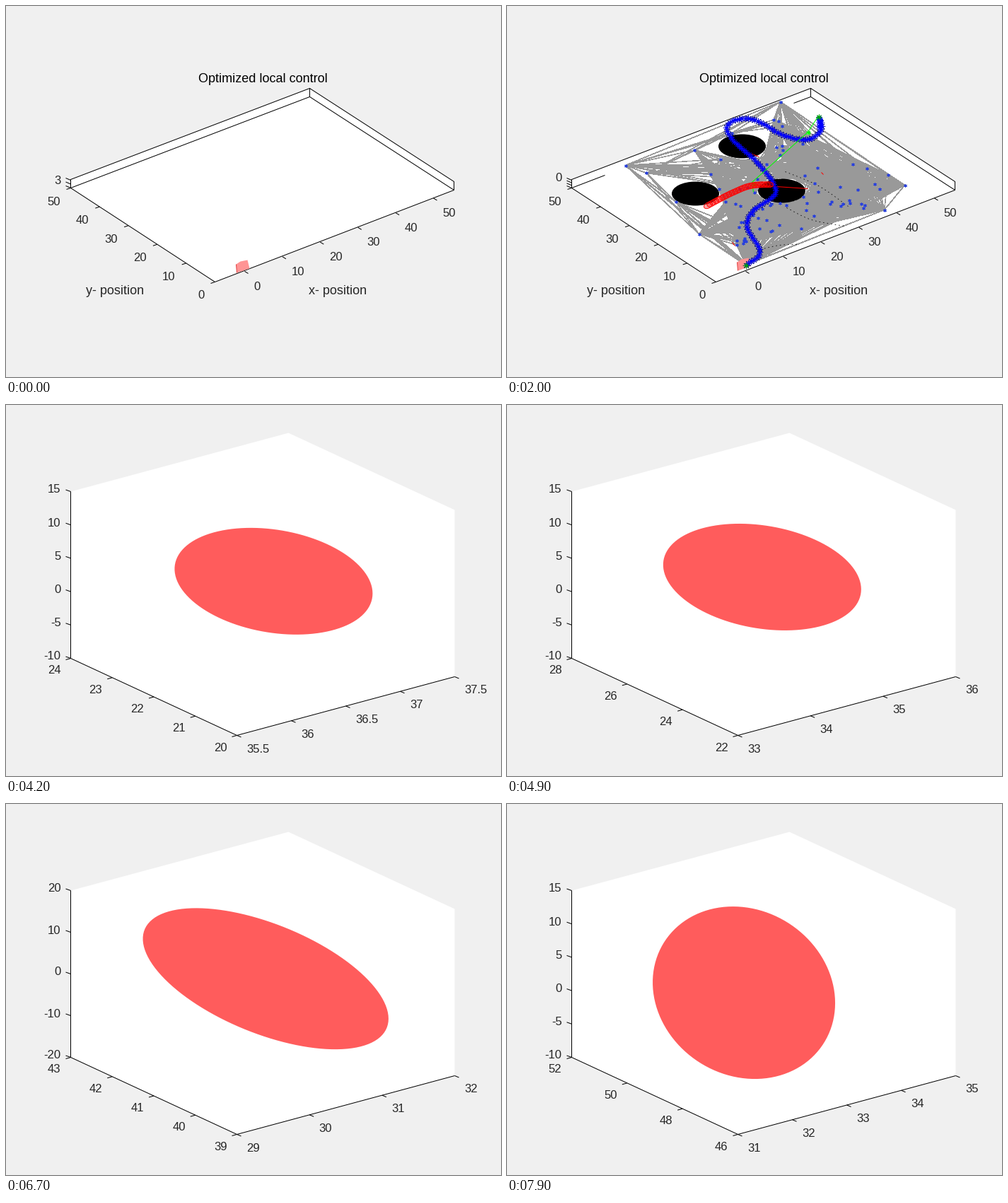
Recreate the animation shown at these times as a matplotlib script. Size 700x525 px, loop 8000 ms.

```python
import itertools

import matplotlib.pyplot as plt
import numpy as np
from matplotlib.animation import FuncAnimation
from matplotlib.collections import LineCollection
from matplotlib.patches import Ellipse, Polygon

W, H, FRAMES, SWITCH = 700, 525, 80, 37
PX = 0.72  # points per pixel at 100 dpi
INK, GRAY, RED, PINK = "#262626", "#999999", "#ff0000", "#ff5c5c"
BLUE, GREEN = "#0000ff", "#00ff00"

plt.rcParams["font.family"] = "Liberation Sans"
plt.rcParams["lines.solid_capstyle"] = "butt"
fig = plt.figure(figsize=(W / 100, H / 100), dpi=100, facecolor="#f0f0f0")
ax = fig.add_axes([0, 0, 1, 1])


def spline(pts, m=20):
    """Catmull-Rom curve through pts."""
    p = np.asarray(pts, float)
    p = np.vstack([p[:1], p, p[-1:]])
    t = np.linspace(0, 1, m, endpoint=False)[:, None]
    out = [0.5 * (2 * b + (c - a) * t + (2 * a - 5 * b + 4 * c - d) * t**2
                  + (3 * b - a - 3 * c + d) * t**3)
           for a, b, c, d in zip(p, p[1:], p[2:], p[3:])]
    return np.vstack(out + [p[-1:]])


def even(curve, step):
    """Points spaced evenly along a curve."""
    s = np.r_[0, np.cumsum(np.hypot(*np.diff(curve, axis=0).T))]
    u = np.arange(0, s[-1], step)
    return np.c_[np.interp(u, s, curve[:, 0]), np.interp(u, s, curve[:, 1])]


def line(pts, color="k", w=1.0, z=3, **kw):
    x, y = np.asarray(pts, float).T
    ax.plot(x, y, color=color, lw=w * PX, zorder=z, **kw)


def marks(pts, color, size, arms=8, w=0.8, z=5):
    x, y = np.asarray(pts, float).T
    ax.plot(x, y, ls="", marker=(arms, 2, 0), ms=size * PX, mec=color,
            mew=w * PX, zorder=z)


def text(x, y, s, ha="center", size=16.67, color=INK):
    ax.text(x, y, s, ha=ha, va="baseline", fontsize=size * PX, color=color, zorder=9)


def tick(p, d):
    line([p, (p[0] + d[0], p[1] + d[1])])


# ---------- roadmap scene ----------
FRONT, RIGHT, BACK, LEFT = (295, 390), (633, 260), (429, 128), (91, 257)
RIGHT_T, BACK_T, LEFT_T = (633, 248), (429, 116), (91, 245)

DISCS = [(332, 201), (266, 268), (388, 264)]
RX, RY = 33.5, 17
HULL = np.array([(337, 369), (271, 325), (167, 228), (386, 138), (562, 256), (533, 291)], float)


def hits(a, b):
    """Does segment a-b touch an obstacle?"""
    for c in DISCS:
        p, q = (a - c) / (RX, RY), (b - c) / (RX, RY)
        d = q - p
        t = np.clip(-p @ d / max(d @ d, 1e-9), 0, 1)
        if np.hypot(*(p + t * d)) < 1.03:
            return True
    return False


rng = np.random.default_rng(4)
inner = rng.dirichlet([0.4] * len(HULL), 80) @ HULL
NODES = np.vstack([HULL, [p for p in inner if not hits(p, p)]])
EDGES = np.array([(a, b) for a, b in itertools.combinations(NODES, 2) if not hits(a, b)])

ROUTE = even(spline([
    (337, 369), (357, 350), (339, 316), (347, 292), (379, 266), (358, 229),
    (318, 191), (312, 169), (345, 162), (390, 185), (425, 191), (444, 176), (440, 160)]), 4.6)
GOAL = [(440 + i % 3, 160 + 2 * i) for i in range(9)]
ARCS = [spline(a) for a in (
    [(393, 237), (440, 257), (482, 286)],
    [(395, 288), (430, 305), (477, 314)],
    [(358, 347), (385, 341), (412, 340)])]
TUBE = spline([(283, 285), (320, 266), (350, 256), (400, 256), (442, 257)])
SLOPE = np.gradient(TUBE[:, 1], TUBE[:, 0])


def draw_tube(n, s):
    for x in 284 + 4.5 * np.arange(n):
        y, k = np.interp(x, TUBE[:, 0], TUBE[:, 1]), np.interp(x, TUBE[:, 0], SLOPE)
        ax.add_patch(Ellipse((x, y + s), 13, 8, angle=np.degrees(np.arctan(k)),
                             fc=(1, 0, 0, 0.35), ec=(1, 0, 0, 0.9), lw=PX, zorder=7))


def draw_box(n):
    ax.add_patch(Polygon([LEFT_T, BACK_T, RIGHT_T, RIGHT, FRONT, LEFT], fc="w", zorder=0))
    line([LEFT, LEFT_T, BACK_T, RIGHT_T, RIGHT])
    line([BACK_T, BACK, RIGHT], z=1)
    if n:
        line([LEFT, (138, 239)])
        line([(405, 137), BACK])
    else:
        line([LEFT, BACK])
    line([LEFT, FRONT, RIGHT])
    for i in range(6):
        px, py = 337 + 53.4 * i, 375 - 20.7 * i
        tick((px, py), (5, 3))
        text(px + 13, py + 26, str(10 * i), "left")
        px, py = 295 - 40.8 * i, 390 - 26.6 * i
        tick((px, py), (-6, 2))
        text(px - 15, py + 24, str(10 * i), "right")
    for y in np.linspace(246, 257, 4 if n else 3):
        tick((91, y), (-7, -3))
    text(363, 108, "Optimized local control", size=18, color="k")
    text(154, 407, "y- position", size=18)
    text(469, 408, "x- position", size=18)


def draw_map(n):
    draw_box(n)
    s = 0 if n < 15 else -3 if n < 22 else -4  # the z limits grow twice
    up = np.array([0, s])
    patch = np.array([(326, 377), (325, 365), (331, 361), (341, 359), (344, 371)]) + up
    ax.add_patch(Polygon(patch, fc="#ff9494", ec="none", zorder=4))
    line(patch[:2], "#e04040", z=4)
    if n == 0:
        text(77, 252, "3", "right")
        return
    text(77, 250 + s, "0", "right")
    if n >= 22:
        text(77, 254, "-1.5", "right")

    ax.add_collection(LineCollection(EDGES + up, colors=GRAY, linewidths=0.5 * PX,
                                     antialiaseds=False, zorder=2), autolim=False)
    for c in DISCS:
        ax.add_patch(Ellipse(c + up, 2 * RX, 2 * RY, fc="k", zorder=2.6))
    for a in ARCS:
        line(a + up, w=0.8, z=4, ls=(0, (2, 5)))
    marks(NODES + up, "#2840dc", 5, arms=6, z=4)

    for seg in ([(350, 256), (425, 261)], [(444, 238), (447, 241)],
                [(346, 212), (356, 216)], [(318, 337), (322, 342)]):
        line(np.array(seg) + up, RED, z=4)

    marks(ROUTE + up, "k", 9.5, w=0.6)
    marks(ROUTE + up, BLUE, 8, z=5.1)
    marks(GOAL + up, BLUE, 8, z=5.1)
    line(np.array([(348, 266), (346, 252), (425, 181), (440, 158)]) + up, GREEN, z=6)
    marks(np.array([(425, 181), (348, 254)]) + up, GREEN, 6, z=6)
    marks(np.array([(337, 369), (440, 159)]) + up, "#00a000", 8, z=6)
    draw_tube(n, s)


# ---------- close-up scene ----------
F, U, V, Z = (np.array(v) for v in ((326, 467), (308, -83), (-235, -109), (0, -236)))

# step, centre x y z, reach in x y, width and height on stage, lean
KEYS = np.array([
    (37, 35.2, 18.8, 2.5, 1.1, 2, 140, 75.5, 0.23),
    (42, 36.6, 22, 2.5, 0.7, 2, 140, 75.5, 0.23),
    (49, 34.62, 25.37, 2.5, 1.1, 2, 140, 75.5, 0.23),
    (58, 30.18, 33, 4.7, 1.1, 1.5, 149.5, 58, 0.67),
    (74, 30.46, 46.59, 2.5, 1.1, 1.5, 192.5, 132.5, 0.485),
    (79, 32.53, 48.79, 2.5, 1.5, 2, 129, 122, 0.12)])


def ticks(mid, reach):
    """Finest round ticks around mid that make at most four intervals."""
    for s in (0.5, 1, 2, 5):
        lo, hi = np.floor((mid - reach) / s), np.ceil((mid + reach) / s)
        if hi - lo <= 4:
            return np.arange(lo, hi + 1) * s


def fraction(v, t):
    return (v - t[0]) / (t[-1] - t[0])


def draw_closeup(n):
    x, y, z, rx, ry, w, h, lean = (np.interp(n, KEYS[:, 0], c) for c in KEYS.T[1:])
    xt, yt = ticks(x, rx), ticks(y, ry)
    zt = np.arange(-20, 21, 10) if 56 <= n < 68 else np.arange(-10, 16, 5)

    ax.add_patch(Polygon([F, F + U, F + U + Z, F + U + V + Z, F + V + Z, F + V],
                         fc="w", zorder=0))
    line([F + V + Z, F + V, F, F + U])
    for v in xt:
        p = F + U * fraction(v, xt)
        tick(p, (6, 2.5))
        text(p[0] + 13.5, p[1] + 24, f"{v:g}", "left")
    for v in yt:
        p = F + V * fraction(v, yt)
        tick(p, (-7, 2))
        text(p[0] - 14, p[1] + 22, f"{v:g}", "right")
    for v in zt:
        p = F + V + Z * fraction(v, zt)
        tick(p, (-7, -2.5))
        text(77, p[1] + 2, str(v), "right")

    center = F + fraction(x, xt) * U + fraction(y, yt) * V + fraction(z, zt) * Z
    t = np.linspace(0, 2 * np.pi, 120)
    blob = np.c_[w * np.cos(t), h * np.sin(t + np.arcsin(lean))]
    ax.add_patch(Polygon(center + blob, fc=PINK, ec="none", zorder=4))


def draw(n):
    ax.cla()
    ax.axis("off")
    ax.set_xlim(-0.5, W - 0.5)
    ax.set_ylim(H - 0.5, -0.5)
    (draw_map if n < SWITCH else draw_closeup)(n)
    return []


anim = FuncAnimation(fig, draw, frames=FRAMES, interval=100, repeat=True,
                     repeat_delay=0, init_func=lambda: [])
plt.show()
```
